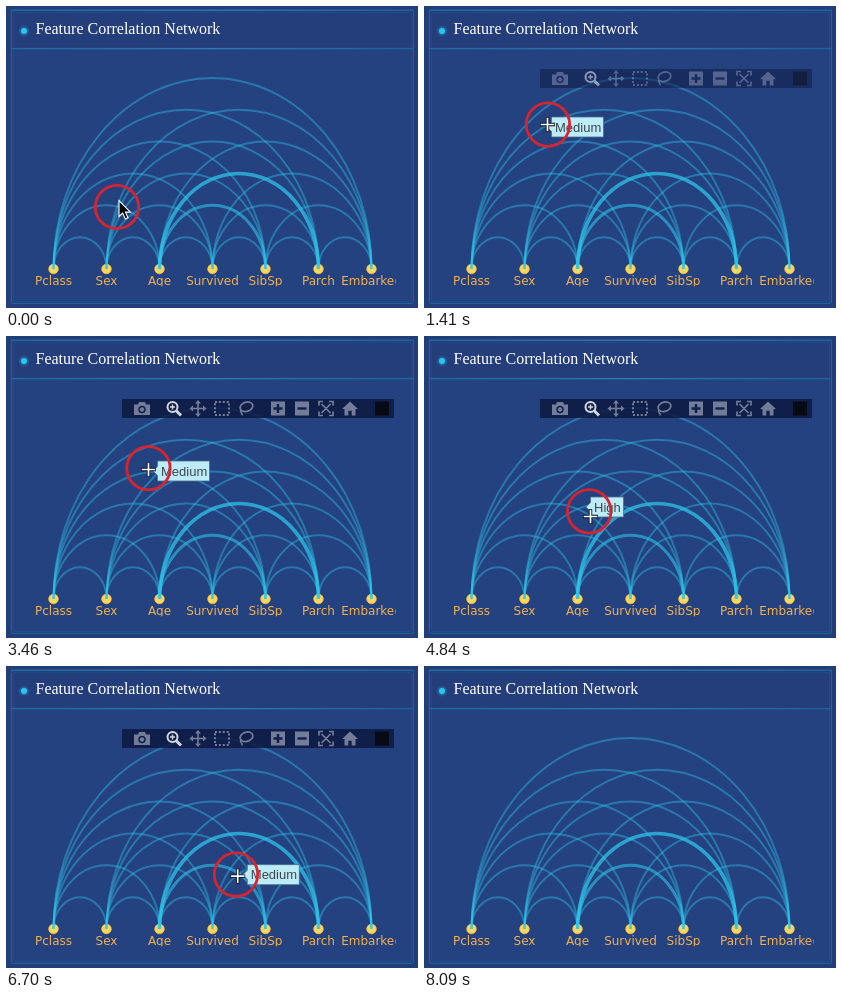
An HTML page that plays this animation: 412 by 302 pixels, repeating every 9660 ms.

```html
<!DOCTYPE html>
<html lang="en">
<head>
<meta charset="utf-8">
<title>Feature Correlation Network</title>
<style>
  html, body { margin: 0; width: 100%; height: 100%; overflow: hidden; background: #223e79; }
  svg { display: block; width: 412px; height: 302px; }
  .title { font: 16px "Liberation Serif", "Times New Roman", serif; fill: #fff; }
  .axis { font: 12px "DejaVu Sans", Verdana, sans-serif; fill: #f4b04a; text-anchor: middle; }
  .tip { font: 13px "Liberation Sans", Arial, sans-serif; fill: #3c4650; }
  .arcs { fill: none; stroke: #30c8ec; }
  .icon { fill: none; stroke: #737d99; stroke-width: 2; }
  .icon .solid { fill: #737d99; stroke: none; }
  .icon .hole { fill: #111f4c; stroke: none; }
  .icon.on { stroke: #d3d7df; }
</style>
</head>
<body>
<svg viewBox="0 0 412 302">
  <defs>
    <linearGradient id="edge">
      <stop offset="0" stop-color="#1d6a9e"/>
      <stop offset=".5" stop-color="#2a7fae"/>
      <stop offset="1" stop-color="#1d6297"/>
    </linearGradient>
    <radialGradient id="glow">
      <stop offset="0" stop-color="#29c8f0" stop-opacity=".6"/>
      <stop offset="1" stop-color="#29c8f0" stop-opacity="0"/>
    </radialGradient>
    <clipPath id="plot"><path d="M0 0H389.5V280.3H0Z"/></clipPath>
  </defs>

  <rect x="4" y="4" width="404" height="294" fill="#244180"/>
  <rect x="5" y="4" width="403" height="37" fill="#233e7b"/>
  <g fill="none" stroke="#1d629a">
    <rect x="5.5" y="4.5" width="402" height="293" rx="2"/>
    <rect x="7.5" y="6.5" width="398" height="289" rx="2" opacity=".35"/>
  </g>
  <rect x="5" y="3.5" width="403" height="1.3" fill="url(#edge)"/>
  <rect x="5" y="42" width="403" height="1.3" fill="url(#edge)"/>
  <circle cx="18" cy="25" r="6" fill="url(#glow)"/>
  <circle cx="18" cy="25" r="3" fill="#29c5ee"/>
  <text class="title" x="29.5" y="28">Feature Correlation Network</text>

  <g id="nodes" clip-path="url(#plot)"></g>
  <g id="arcs" class="arcs"></g>

  <g id="bar">
    <rect x="116" y="63" width="272" height="19" fill="#0d1a42" opacity=".86"/>
  </g>

  <g id="tip">
    <path id="tipBox" fill="#bdebf6" stroke="#486f8e" stroke-width=".8"/>
    <text id="tipText" class="tip" x="8" y="4.7"></text>
  </g>

  <circle id="ring" r="21.7" fill="none" stroke="#d9232e" stroke-width="2.8"/>
  <path id="arrow" d="M0 0V16L3.7 12.6L6.3 18.4L9 17.2L6.5 11.6H11.4Z"
        fill="#080808" stroke="#fff" stroke-width="1.1"/>
  <g id="cross" fill="none">
    <path d="M-7.5 0H7.5M0 -7.5V7.5" stroke="#0b1020" stroke-width="3.4"/>
    <path d="M-6.8 0H6.8M0 -6.8V6.8" stroke="#fff" stroke-width="1.7"/>
  </g>
</svg>

<script>
const LOOP = 9660;
const $ = id => document.getElementById(id);
const add = (parent, tag, attrs, text) => {
  const el = document.createElementNS("http://www.w3.org/2000/svg", tag);
  for (const key in attrs) el.setAttribute(key, attrs[key]);
  if (text) el.textContent = text;
  return parent.appendChild(el);
};
const move = (el, x, y) => el.setAttribute("transform", `translate(${x} ${y})`);
const show = (el, on) => el.style.display = on ? "" : "none";
const lerp = (a, b, p) => a + (b - a) * p;

// Nodes and the arcs joining every pair
const names = ["Pclass", "Sex", "Age", "Survived", "SibSp", "Parch", "Embarked"];
const nodeX = i => 47.5 + 53 * i;
const BASE = 263;
const strong = { "2-5": [3.7, .72], "2-4": [3, .58] };

names.forEach((name, i) => {
  add($("nodes"), "circle", { cx: nodeX(i), cy: BASE, r: 4.8, fill: "#ffd75c", stroke: "#f3b648", "stroke-width": .8 });
  add($("nodes"), "text", { class: "axis", x: nodeX(i), y: 279 }, name);
  for (let j = i + 1; j < names.length; j++) {
    const span = j - i;
    const [width, opacity] = strong[`${i}-${j}`] || [2, .4];
    add($("arcs"), "path", {
      d: `M${nodeX(i)} ${BASE}A${26.5 * span} ${31.85 * span} 0 0 1 ${nodeX(j)} ${BASE}`,
      "stroke-width": width, "stroke-opacity": opacity
    });
  }
});

// Toolbar icons, each drawn around its own centre
const icons = [
  [136, '<path class="solid" d="M-8 -4H-4L-3 -6.5H3L4 -4H8V6.5H-8Z"/><circle class="hole" cy="1" r="3.7"/><circle class="solid" cy="1" r="2.2"/>'],
  [168, '<circle cx="-1.5" cy="-1.5" r="5"/><path d="M2 2L7 7" stroke-width="3"/><path d="M-4 -1.5H1M-1.5 -4V1" stroke-width="1.4"/>'],
  [192, '<path d="M-6 0H6M0 -6V6" stroke-width="1.6"/><path class="solid" d="M-8.5 0L-5 -3V3ZM8.5 0L5 -3V3ZM0 -8.5L-3 -5H3ZM0 8.5L-3 5H3Z"/>'],
  [216, '<path d="M-7 -6.5H7V6.5H-7Z" stroke-dasharray="2 1.9"/>'],
  [240, '<ellipse cx="1" cy="-1.5" rx="6.5" ry="4.6" transform="rotate(-18)" stroke-width="1.7"/><path d="M-5 1C-7 4 -3 4 -4 7" stroke-width="1.6"/>'],
  [272, '<path class="solid" d="M-7 -7H7V7H-7Z"/><path class="hole" d="M-1.2 -4.5H1.2V-1.2H4.5V1.2H1.2V4.5H-1.2V1.2H-4.5V-1.2H-1.2Z"/>'],
  [296, '<path class="solid" d="M-7 -7H7V7H-7Z"/><path class="hole" d="M-4.5 -1.2H4.5V1.2H-4.5Z"/>'],
  [320, '<path d="M-7 -3V-7H-3M3 -7H7V-3M7 3V7H3M-3 7H-7V3M-4.5 -4.5L4.5 4.5M4.5 -4.5L-4.5 4.5" stroke-width="1.7"/>'],
  [344, '<path class="solid" d="M0 -7L8 .5H5.5V7H1.7V2.3H-1.7V7H-5.5V.5H-8Z"/>'],
  [376, '<rect x="-7" y="-7" width="14" height="14" fill="#080a14" stroke="none"/>']
];
icons.forEach(([x, shapes], i) => {
  const icon = add($("bar"), "g", { class: i === 1 ? "icon on" : "icon" });
  icon.innerHTML = shapes;
  move(icon, x, 72.5);
});

// Pointer moves: first step, last step, steps, x, y, label, label x, label y
const moves = [
  [0, 0, 1, 111, 201, "", 123, 121],
  [240, 1150, 8, 124.5, 124, "", 123, 121],
  [1280, 1410, 2, 123, 118, "Medium", 123, 121],
  [2270, 2650, 4, 126, 97, "High", 131, 97],
  [2940, 3460, 5, 142, 133, "Medium", 147, 135],
  [3960, 4460, 5, 158, 157, "Medium", 160, 153],
  [4840, 4840, 1, 166, 180, "High", 162, 171],
  [4970, 5100, 2, 177, 191, "High", 176, 188],
  [5480, 5740, 3, 182, 199, "High", 188, 198],
  [6440, 7200, 7, 307, 226, "Medium", 312, 225],
  [7330, 7330, 1, 346, 215, "", 346, 215]
];
const HIDE = 7460;
const barSteps = [[0, 0], [1280, .25], [1410, .6], [1540, .88], [1670, 1],
                  [7710, .75], [7840, .5], [7970, .25], [8090, 0]];
const tipWidth = { Medium: 52, High: 33 };
const ease = p => p * p * (3 - 2 * p);

function pointer(t) {
  let i = moves.length - 1;
  while (t < moves[i][0]) i--;
  const to = moves[i], from = moves[i - 1] || to;
  const [start, end, count] = to;
  const gap = count > 1 ? (end - start) / (count - 1) : 1;
  const step = Math.min(count, Math.floor((t - start) / gap + .02) + 1);
  const p = ease(step / count), before = ease((step - 1) / count);
  const at = (k, q = p) => lerp(from[k], to[k], q);
  return {
    x: at(3), y: at(4), tipX: at(6), tipY: at(7),
    lagX: .2 * (at(3) - at(3, before)), lagY: .2 * (at(4) - at(4, before)),
    label: i === 3 && step < count ? from[5] : to[5]
  };
}

function draw(t) {
  const { x, y, tipX, tipY, lagX, lagY, label } = pointer(t);
  const live = t < HIDE, arrow = t < 1280;

  $("bar").setAttribute("opacity", barSteps.filter(s => s[0] <= t).pop()[1]);

  show($("ring"), live);
  show($("arrow"), live && arrow);
  show($("cross"), live && !arrow);
  if (arrow) move($("ring"), x, y);
  else move($("ring"), x + .8 - Math.min(lagX, 2), y - lagY);
  move($("arrow"), x + 2, y - 6.5);
  move($("cross"), x + .5, y + .5);

  show($("tip"), live && label);
  if (label) {
    const right = 4.5 + tipWidth[label];
    $("tipBox").setAttribute("d", `M0 0L4.5 -4.5V-10H${right}V10H4.5V4.5Z`);
    $("tipText").textContent = label;
    move($("tip"), tipX, tipY);
  }
}

const began = performance.now();
function tick() {
  draw((performance.now() - began) % LOOP);
  requestAnimationFrame(tick);
}
tick();
</script>
</body>
</html>
```
